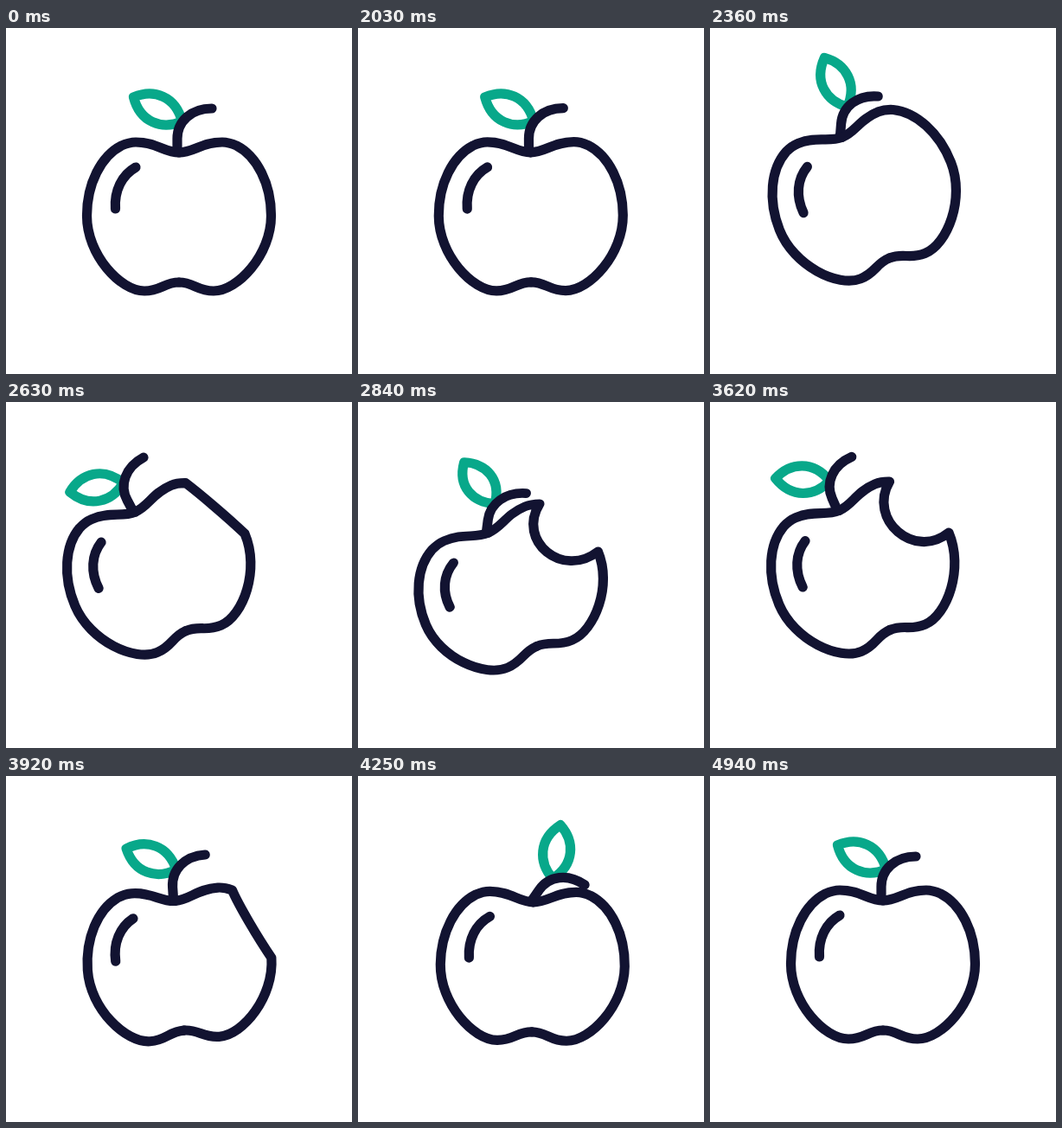
Animation, 400 px wide and 400 px high, one loop 5030 ms. Source, as an HTML page:

```html
<!DOCTYPE html>
<html lang="en">
<head>
<meta charset="utf-8">
<title>Apple</title>
<style>
  html, body { margin: 0; height: 100%; overflow: hidden; background: #fff; }
  svg { display: block; width: 100vw; height: 100vh; }
  path { fill: none; stroke: #121331; stroke-width: 11.2; stroke-linecap: round; stroke-linejoin: round; }
  #leaf { stroke: #08a88a; }
</style>
</head>
<body>
<svg viewBox="0 0 400 400">
  <g id="apple">
    <g id="stem">
      <path id="leaf" d="M147.5 80C171 70 196 79 203.5 108C180 118 155 109 147.5 80Z"/>
      <path d="M198 142V128C198 108 214 93 238 93"/>
    </g>
    <path id="left" transform="matrix(-1 0 0 1 400 0)"/>
    <path id="right"/>
    <path d="M150 161C134 170 125 188 126.5 209"/>
  </g>
</svg>
<script>
const LOOP = 5030, START = 2030, END = 4940, STEP = 30;
const $ = id => document.getElementById(id);
const move = (id, value) => $(id).setAttribute('transform', value);

// Eased 0 to 1 between two times
function ramp(t, from, to) {
  const p = Math.min(1, Math.max(0, (t - from) / (to - from)));
  return p < .5 ? 2 * p * p : 1 - 2 * (1 - p) ** 2;
}

// Rises to 1 at the peak, then swings out like a damped spring
function swing(t, peak) {
  const s = (t - peak) / 250;
  if (s < -1) return 0;
  return s < 0 ? Math.cos(Math.PI * s / 2) ** 2 : Math.cos(Math.PI * s) * Math.exp(-1.2 * s);
}

// Half outline; bite moves the upper flank from intact (0) to bitten (1)
function half(bite) {
  const mix = (a, b) => a + (b - a) * bite;
  return `M200 144C217 144 226 132 250 132C256 132 261 133.5 266.5 136
    C${mix(290, 225.8)} ${mix(148, 166.5)} ${mix(306.5, 257.4)} ${mix(180, 230.9)} 306.5 217
    C306.5 262 268 304 240 304C221 304 217 294 200 294`;
}

function draw(t) {
  const back = ramp(t, 3640, 4080);
  const away = ramp(t, 2000, 2440) - back;
  const over = back - ramp(t, 4080, 4330);
  const hit = ramp(t, 2590, 2820) - ramp(t, 2820, 3090);
  const bite = ramp(t, 2600, 2690) - ramp(t, 3700, 4050);
  const first = swing(t, 2360), second = swing(t, 2840), third = swing(t, 4240);

  move('apple', `translate(${200 - 24 * away + 9 * over} ${212 - 24 * away + 9 * over + 23 * hit})
    rotate(${3 * over - 23 * away}) scale(${1 + .015 * hit} ${1 - .05 * hit}) translate(-200 -212)`);
  move('stem', `rotate(${26 * first + 26 * second + 36 * third} 199 143)`);
  move('leaf', `rotate(${34 * first + 19 * second + 39 * third} 203.5 108)`);
  $('right').setAttribute('d', half(bite));
}

$('left').setAttribute('d', half(0));
const begin = performance.now();
function tick() {
  const t = (performance.now() - begin) % LOOP;
  const moving = t >= START && t < END;
  draw(moving ? START + Math.floor((t - START) / STEP) * STEP : 0);
  requestAnimationFrame(tick);
}
tick();
</script>
</body>
</html>
```
